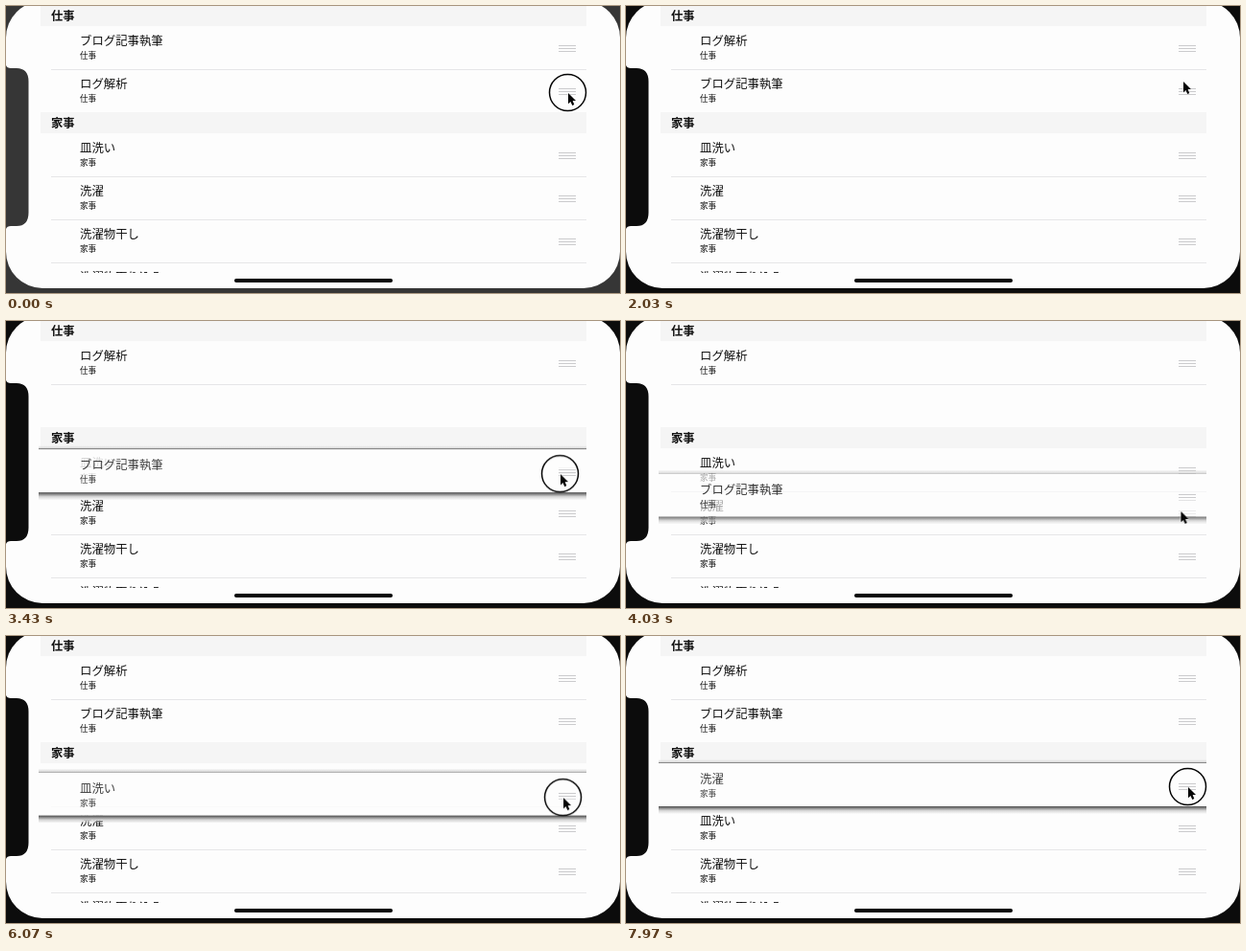
Recreate the animation shown at these times as an HTML page. Size 640 by 300 pixels, loop 8 s.

```html
<!DOCTYPE html>
<html lang="ja">
<head>
<meta charset="utf-8">
<title>Reorder list</title>
<style>
@property --lift { syntax: "<number>"; inherits: true; initial-value: 0; }
@property --dark { syntax: "<color>"; inherits: true; initial-value: #0c0c0c; }

html, body { margin: 0; width: 100%; height: 100%; overflow: hidden; }
body {
  position: relative;
  background: var(--dark);
  font-family: "Noto Sans CJK JP", "Noto Sans CJK", sans-serif;
  color: #111;
  animation: dark 8s step-end infinite;
}
.screen, .list, .list *, .home, .notch, .pointer { position: absolute; }
.screen { left: 0; top: -5px; width: 640px; height: 299.5px; border-radius: 38px; background: #fdfdfd; }
.notch { left: 0; top: 0; fill: var(--dark); }
.home { left: 238px; top: 285px; width: 165px; height: 4px; border-radius: 2px; background: #050505; }
.list { left: 0; top: 0; width: 640px; height: 279px; overflow: hidden; white-space: nowrap; }

.head {
  left: 36px; width: 558px; height: 22px; padding-left: 11px;
  background: #f5f5f5; font: bold 12.3px/23px "Noto Sans CJK JP", "Noto Sans CJK", sans-serif;
}
.line { left: 47px; width: 558px; height: 1px; background: #e6e6e8; }

.row { left: 0; width: 640px; height: 45px; }
.card {
  left: 34px; top: -2px; width: 571px; height: 47px;
  background: rgba(253, 253, 253, .84); opacity: var(--lift);
}
.card::before, .card::after { content: ""; position: absolute; left: 0; width: 100%; }
.card::before { top: -3px; height: 4px; background: linear-gradient(#9990, #d8d8d8 75%, #888 75%); }
.card::after { top: 46px; height: 8px; background: linear-gradient(#4a4a4a, #8a8a8a 25%, #d4d4d4 55%, #eee0); }
.row b, .row i { left: 77px; font-style: normal; font-weight: 400; opacity: calc(1 - .2 * var(--lift)); }
.row b { top: 6.5px; font-size: 12.4px; line-height: 16px; }
.row i { top: 25px; font-size: 8.6px; line-height: 10px; font-weight: 500; }
.row u {
  left: 576px; top: 20px; width: 18px; height: 7px;
  background: repeating-linear-gradient(#cbcbcd 0 1px, #0000 1px 3px);
}

.pointer { left: 0; top: 0; overflow: visible; animation: pointer 8s linear infinite; }
.ring { fill: none; stroke: #050505; stroke-width: 1.5; animation: press 8s step-end infinite; }
.blog { animation: blog 8s linear infinite; }
.log { animation: log 8s linear infinite; }
.dish { animation: dish 8s linear infinite; }
.wash { animation: wash 8s linear infinite; }

@keyframes dark { 0% { --dark: #363636; } .375%, 100% { --dark: #0c0c0c; } }

@keyframes press {
  0%, 31.25%, 65%, 98.375% { opacity: 1; }
  17.5%, 49.375%, 80.25% { opacity: 0; }
  100% { opacity: 1; }
}

@keyframes pointer {
  0%, 6.625% { transform: translate(586px, 91px); }
  13.375% { transform: translate(582px, 51px); }
  16.625%, 17.5% { transform: translate(582px, 44px); }
  25.375% { transform: translate(581px, 79px); }
  27.125%, 28.375% { transform: translate(581px, 84px); }
  29.125%, 37.5% { transform: translate(581px, 90px); }
  42.875% { transform: translate(578px, 160px); }
  47.125%, 49.375% { transform: translate(577px, 214px); }
  57.875%, 59.625% { transform: translate(589px, 88px); }
  65%, 74.125% { transform: translate(580px, 158px); }
  75.875% { transform: translate(581px, 169px); }
  79.75%, 80.25% { transform: translate(583px, 212px); }
  84.125%, 87.5% { transform: translate(583px, 225px); }
  89.375% { transform: translate(583px, 229px); }
  97.125%, 100% { transform: translate(586px, 158px); }
  6.625%, 37.5%, 74.125% { animation-timing-function: ease-in; }
  13.375%, 42.875%, 75.875% { animation-timing-function: ease-out; }
  17.5%, 49.375%, 59.625%, 80.25%, 89.375% { animation-timing-function: ease-in-out; }
}

@keyframes log {
  0%, .375% { --lift: 0; transform: none; }
  3.75%, 6.625% { --lift: 1; transform: none; }
  13.375% { --lift: 1; transform: translateY(-36px); }
  16.625%, 17.5% { --lift: 1; transform: translateY(-49px); }
  20.625%, 100% { --lift: 0; transform: translateY(-45px); }
  6.625% { animation-timing-function: ease-in; }
  13.375%, 17.5% { animation-timing-function: ease-out; }
}

@keyframes blog {
  0%, 12.625% { --lift: 0; transform: none; animation-timing-function: ease-in-out; }
  16.25%, 31.25% { --lift: 0; transform: translateY(45px); }
  35.375%, 37.5% { --lift: 1; transform: translateY(45px); }
  42.875% { --lift: 1; transform: translateY(114px); }
  47.125%, 49.375% { --lift: 1; transform: translateY(168px); }
  53.75%, 100% { --lift: 0; transform: translateY(45px); }
  37.5% { animation-timing-function: ease-in; }
  42.875% { animation-timing-function: ease-out; }
  49.375% { animation-timing-function: ease-in-out; }
}

@keyframes dish {
  0%, 65% { --lift: 0; transform: none; }
  68.375%, 74.125% { --lift: 1; transform: none; }
  75.875% { --lift: 1; transform: translateY(10.5px); }
  79.75%, 80.25% { --lift: 1; transform: translateY(54px); }
  83.75%, 100% { --lift: 0; transform: translateY(45px); }
  74.125% { animation-timing-function: ease-in; }
  75.875%, 80.25% { animation-timing-function: ease-out; }
}

@keyframes wash {
  0%, 77.25% { --lift: 0; transform: none; animation-timing-function: ease-in-out; }
  80.75%, 98.375% { --lift: 0; transform: translateY(-45px); }
  99.625%, 100% { --lift: 1; transform: translateY(-44px); }
}
</style>
</head>
<body>
<div class="screen"></div>
<svg class="notch" width="30" height="300">
  <path d="M0 62Q1 65 5 65H11Q23.5 65 23.5 79V216Q23.5 230 11 230H5Q1 230 0 233Z"/>
</svg>

<div class="list">
  <div class="head" style="top:-1px">仕事</div>
  <div class="head" style="top:111px">家事</div>
  <div class="line" style="top:66px"></div>
  <div class="line" style="top:178px"></div>
  <div class="line" style="top:223px"></div>
  <div class="line" style="top:268px"></div>

  <div class="row" style="top:268px"><b>洗濯物取り込み</b></div>
  <div class="row" style="top:223px"><b>洗濯物干し</b><i>家事</i><u></u></div>
  <div class="row wash" style="top:178px"><div class="card"></div><b>洗濯</b><i>家事</i><u></u></div>
  <div class="row dish" style="top:133px"><div class="card"></div><b>皿洗い</b><i>家事</i><u></u></div>
  <div class="row blog" style="top:21px"><div class="card"></div><b>ブログ記事執筆</b><i>仕事</i><u></u></div>
  <div class="row log" style="top:66px"><div class="card"></div><b>ログ解析</b><i>仕事</i><u></u></div>
</div>

<div class="home"></div>
<svg class="pointer" width="1" height="1">
  <circle class="ring" cx="-.5" cy="-.5" r="19"/>
  <path d="M0 0V11.2L2.5 8.9L4.3 13L6.3 12.1L4.6 8.1H8Z" fill="#050505" stroke="#fdfdfd" stroke-width=".8" paint-order="stroke"/>
</svg>
</body>
</html>
```
